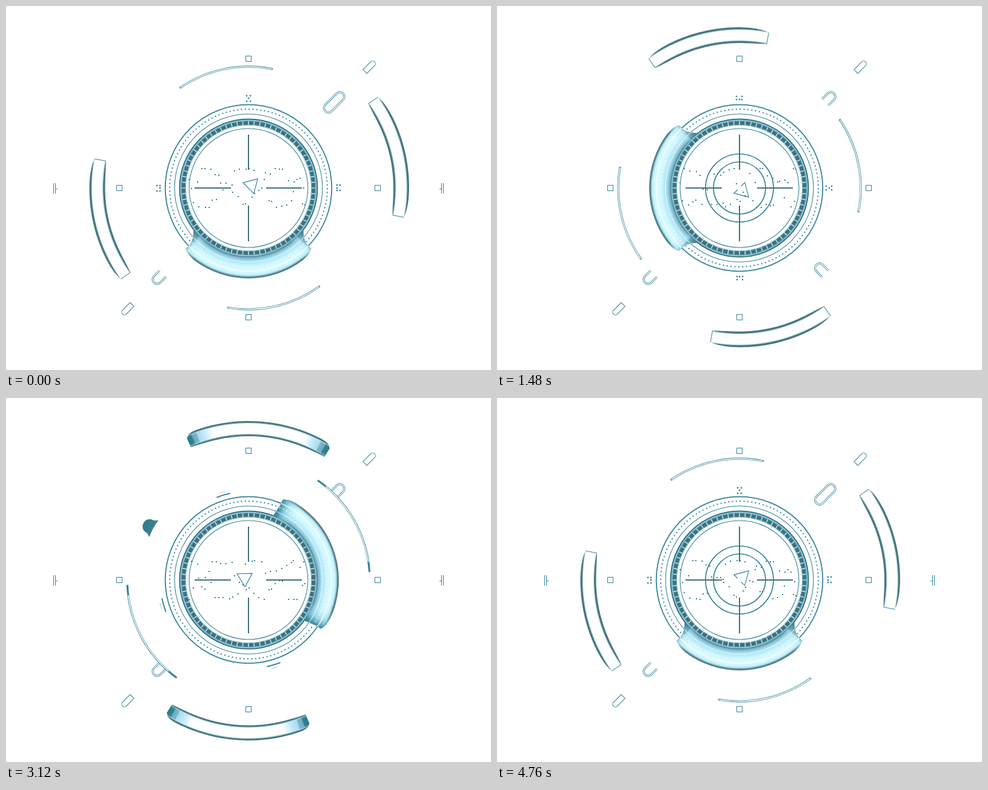
An HTML page with a canvas that plays this animation: 800x600 px, repeating every 4800 ms.

```html
<!DOCTYPE html>
<html lang="en">
<head>
<meta charset="utf-8">
<title>Targeting HUD</title>
<style>
html, body { margin: 0; height: 100%; overflow: hidden; background: #fff; }
canvas { display: block; width: 800px; height: 600px; }
</style>
</head>
<body>
<canvas id="stage" width="800" height="600"></canvas>
<script>
const ctx = document.getElementById('stage').getContext('2d');
const LOOP = 4800, STEP = 40, TAU = Math.PI * 2;
const LINE = '#36839c', DARK = '#2b7d8c', SLATE = '#41707a';
const TURNS = [19, 50, 75, 105];   // steps at which a quarter turn starts
const rad = d => d * Math.PI / 180;
const polar = (r, d) => [r * Math.cos(rad(d)), r * Math.sin(rad(d))];

function random(seed) {
  return () => (seed = (seed * 16807) % 2147483647) / 2147483647;
}
const rnd = random(77);
const dots = Array.from({ length: 52 }, (_, i) => ({
  x: -96 + i * 3.75 + (rnd() - 0.5) * 5,
  phase: i * 0.2 + (i % 2) * Math.PI + (rnd() - 0.5) * 1.2
}));

// Angle turned so far and the smear at this step
function poseAt(n) {
  let angle = 0, blur = 0;
  for (const start of TURNS) {
    const u = Math.min(1, Math.max(0, (n - start) / 4));
    const a = u ** 1.36, b = (1 - u) ** 1.36;
    angle += 90 * a / (a + b);
    blur += 24 * u * (1 - u);
  }
  return { angle, blur };
}

function turned(deg, draw) {
  ctx.save();
  ctx.rotate(rad(deg));
  draw();
  ctx.restore();
}

function stroke(width = 1, color = LINE) {
  ctx.lineWidth = width;
  ctx.strokeStyle = color;
  ctx.stroke();
}

function arc(r, from, to, width, color) {
  ctx.beginPath();
  ctx.arc(0, 0, r, rad(from), rad(to));
  stroke(width, color);
}

const ring = (r, width, color) => arc(r, 0, 360, width, color);

function line(x1, y1, x2, y2, width, color) {
  ctx.beginPath();
  ctx.moveTo(x1, y1);
  ctx.lineTo(x2, y2);
  stroke(width, color);
}

function spot(x, y, size = 2) {
  ctx.fillStyle = LINE;
  ctx.fillRect(x - size / 2, y - size / 2, size, size);
}

function radial(r0, r1, stops) {
  const g = ctx.createRadialGradient(0, 0, r0, 0, 0, r1);
  stops.forEach(([at, color]) => g.addColorStop(at, color));
  return g;
}

// Band centred on the x axis; inner and outer give the radius at u = -1..1
function bandPath(half, inner, outer) {
  const N = 48;
  ctx.beginPath();
  for (let k = 0; k <= 2 * N + 1; k++) {
    const out = k <= N;
    const u = (out ? k : 2 * N + 1 - k) / N * 2 - 1;
    ctx.lineTo(...polar((out ? outer : inner)(u), u * half));
  }
  ctx.closePath();
}

// Same colour stops run inwards from both ends
function endShade(half, stops) {
  const g = ctx.createConicGradient(-Math.PI, 0, 0);
  for (const [deg, color] of stops) g.addColorStop((180 - half + deg) / 360, color);
  for (const [deg, color] of [...stops].reverse()) g.addColorStop((180 + half - deg) / 360, color);
  return g;
}

function outerArc(blur) {
  const half = 23.1 + blur, bump = u => 1 - Math.abs(u) ** 7;
  const soft = u => 1 - Math.abs(u) ** 24;
  if (blur) bandPath(half, u => 239 - 2 * bump(u), u => 255 + 7 * soft(u));
  else bandPath(half, u => 239.5 - 3 * bump(u), u => 258.5 + 4 * bump(u));
  ctx.fillStyle = '#fff';
  if (blur) {
    ctx.fillStyle = endShade(half, [[0, DARK], [2, '#35808f'], [2.1, '#69a9bb'],
      [4, '#7db9cc'], [4.1, '#a9d8ee'], [7, '#c8eafa'], [10, '#ffffff']]);
  }
  ctx.fill();
  ctx.fillStyle = radial(236, 263, [[0, SLATE], [0.13, '#4f7b85'], [0.17, 'rgba(165,215,232,.6)'],
    [0.25, 'rgba(255,255,255,0)'], [0.76, 'rgba(255,255,255,0)'],
    [0.83, 'rgba(165,215,232,.6)'], [0.87, '#4f7b85'], [1, SLATE]]);
  ctx.fill();
  if (blur) return;
  for (const side of [-half, half]) {
    turned(side, () => line(239.5, 0, 258.5, 0, 1, LINE));
  }
}

function thinArc(blur) {
  const half = 23 + blur * 0.6;
  arc(200, -half, half, 3.2, LINE);
  arc(200, -half + 0.4 + blur, half - 0.4 - blur, 1.6, '#fff');
}

// Rings, drawn teal normally and white where the bright plate covers them
function rings(color) {
  ring(137.3, 1.8, color);
  ring(122, 1.1, color);
  ctx.setLineDash([2, TAU * 130 / 128 - 2]);
  ring(130, 2, color);
  ctx.setLineDash([]);
}

function dial() {
  rings(LINE);
  ring(109, 10, '#b4e0ee');
  ring(113.6, 2, '#2f6f84');
  ring(111, 1.2, '#5aa3bd');
  for (let k = 0; k < 72; k++) arc(107.2, k * 5 + 0.45, k * 5 + 4.55, 6, '#3f717c');
  ring(103.6, 1, '#7dbdd3');
  ring(98, 1.1, LINE);
}

function plate(blur) {
  const half = 46 + blur;
  const flare = blur ? 2 : 7;
  ctx.save();
  ctx.beginPath();
  ctx.moveTo(...polar(144, -half));
  ctx.quadraticCurveTo(...polar(148.5, 3 - half), ...polar(149, 9 - half));
  ctx.arc(0, 0, 149, rad(9 - half), rad(half - 9));
  ctx.quadraticCurveTo(...polar(148.5, half - 3), ...polar(144, half));
  ctx.lineTo(...polar(134, half));
  ctx.quadraticCurveTo(...polar(124, half + 1), ...polar(113, half + flare));
  ctx.arc(0, 0, 113, rad(half + flare), rad(-half - flare), true);
  ctx.quadraticCurveTo(...polar(124, -half - 1), ...polar(134, -half));
  ctx.closePath();
  ctx.fillStyle = radial(112, 149.5, [[0, 'rgba(70,120,135,.75)'], [0.08, '#76b0c2'], [0.2, '#a2dced'],
    [0.4, '#c4f2fc'], [0.6, '#d9fbff'], [0.8, '#d0f7ff'], [0.88, '#a9dde9'], [0.92, '#5c8e9a'], [1, '#48676f']]);
  ctx.fill();
  ctx.fillStyle = endShade(half + flare, blur
    ? [[0, DARK], [3, 'rgba(60,140,158,.9)'], [8, 'rgba(130,200,222,.55)'], [16, 'rgba(190,235,248,0)']]
    : [[0, '#3a717d'], [flare, 'rgba(80,145,162,.6)'], [flare + 2, 'rgba(165,225,242,.4)'], [flare + 9, 'rgba(190,235,248,0)']]);
  ctx.fill();
  ctx.clip();
  rings('rgba(255,255,255,.75)');
  ctx.restore();
}

// Two parallel legs from r = 200 joined by a round cap
function hoop(cap, dir) {
  ctx.beginPath();
  ctx.moveTo(200, -7.5);
  ctx.lineTo(cap, -7.5);
  ctx.arc(cap, 0, 7.5, -Math.PI / 2, Math.PI / 2, dir < 0);
  ctx.lineTo(200, 7.5);
  stroke(3.2, LINE);
  stroke(1.5, '#fff');
}

function smearedHoop() {
  const g = ctx.createLinearGradient(177, 0, 197, 0);
  g.addColorStop(0, '#41808b');
  g.addColorStop(1, DARK);
  ctx.beginPath();
  ctx.moveTo(177.5, -16);
  ctx.quadraticCurveTo(183, -11, 188, -11.5);
  ctx.bezierCurveTo(200, -9, 200, 9, 188, 11.5);
  ctx.quadraticCurveTo(183, 11, 177.5, 16);
  ctx.quadraticCurveTo(180, 0, 177.5, -16);
  ctx.fillStyle = g;
  ctx.fill();
}

function bullet() {
  ctx.beginPath();
  ctx.roundRect(271.5, -4.5, 22.5, 9, [0, 5, 5, 0]);
  stroke(1, LINE);
}

// Three dot groups; the plate takes the fourth side
function clusters(blur) {
  const wide = [[-3, -152], [3, -152], [0, -148], [-3, -143], [3, -143]];
  const bent = [[-151, 5], [-146, 5], [-146, 0], [-146, -4], [-151, -4]];
  if (blur) {
    for (const a of [-90, 0, 180]) {
      arc(146, a - 4.6, a + 4.6, 1.8, DARK);
      arc(151, a - 2, a + 2, 0.7, '#8dbdca');
    }
    return;
  }
  [...wide, ...bent].forEach(([x, y]) => spot(x, y, 2.4));
  bent.forEach(([x, y]) => spot(-x, -y, 2.4));
}

function triangle() {
  ctx.beginPath();
  for (const a of [0, 120, 240]) {
    const [x, y] = polar(14.5, a);
    ctx.lineTo(x + 7, y);
  }
  ctx.closePath();
  stroke(1.2, LINE);
}

function fixedParts() {
  for (const a of [-45, 135]) {
    turned(a, () => { hoop(213, 1); bullet(); });
  }
  for (const [x, y] of [[0, -213], [0, 213], [-213, 0], [213, 0]]) {
    ctx.strokeStyle = LINE;
    ctx.lineWidth = 1;
    ctx.strokeRect(x - 4.5, y - 4.5, 9, 9);
  }
}

function sideMarks() {
  for (const s of [-1, 1]) {
    line(s * 321.5, -8, s * 321.5, 9, 1, LINE);
    line(s * 318.5, -8, s * 318.5, 9, 1, LINE);
    line(s * 318.5, 1.5, s * 315, 1.5, 1, LINE);
  }
}

function crosshair() {
  line(0, -88, 0, -30, 2, SLATE);
  line(0, 29, 0, 88, 2, SLATE);
  line(-89, 0, -29, 0, 2, SLATE);
  line(29, 0, 88, 0, 2, SLATE);
}

function draw(n) {
  const { angle, blur } = poseAt(n);
  ctx.setTransform(1, 0, 0, 1, 0, 0);
  ctx.fillStyle = '#fff';
  ctx.fillRect(0, 0, 800, 600);
  ctx.translate(400, 300);

  turned(167.6 - angle, () => outerArc(blur));
  turned(-12.2 - angle, () => {
    ctx.translate(2.5, 0);
    outerArc(blur);
  });
  fixedParts();
  if (n % 12 === 0 || n % 12 > 5) sideMarks();

  for (const rest of [258.5, 77]) {
    turned(rest + angle, () => thinArc(blur));
  }
  turned(angle - 45, () => blur ? smearedHoop() : hoop(186.6, -1));
  turned(angle, () => clusters(blur));
  dial();
  turned(90 + angle, () => plate(blur));

  for (const d of dots) {
    spot(Math.round(d.x), Math.round(32 * Math.sin(d.phase + n / 120 * TAU * 2)));
  }
  turned(angle - 45, triangle);
  if (n % 2) {
    ctx.beginPath();
    ctx.arc(0, 0, 4, 0, TAU);
    ctx.fillStyle = '#fff';
    ctx.fill();
    ring(56, 1.7, LINE);
    ring(43, 1.7, LINE);
  }
  crosshair();
}

const begin = performance.now();
function tick() {
  draw(Math.floor((performance.now() - begin) % LOOP / STEP));
  requestAnimationFrame(tick);
}
tick();
</script>
</body>
</html>
```
